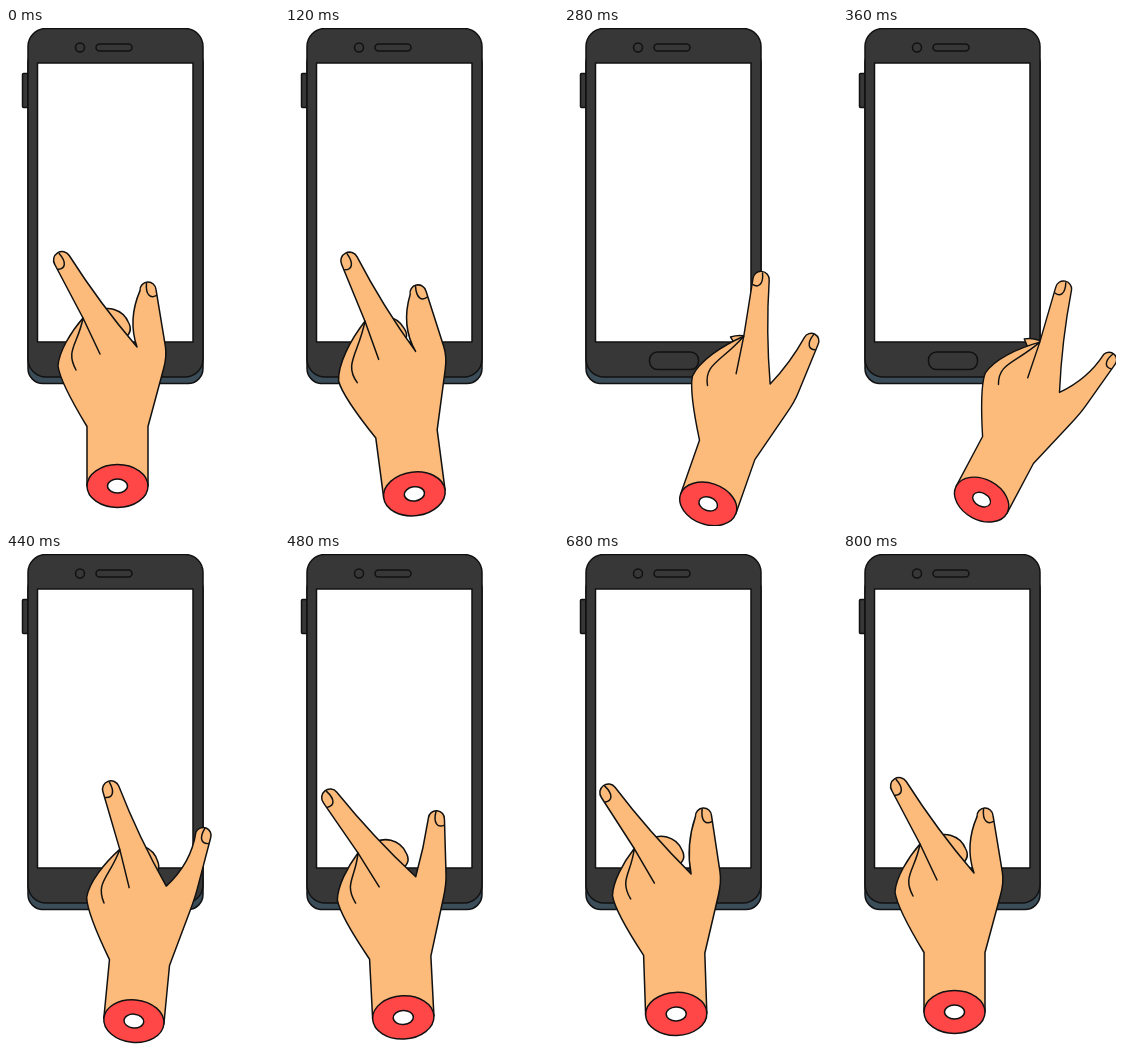
An HTML page that plays this animation: 273 by 498 pixels, repeating every 1920 ms.

```html
<!DOCTYPE html>
<html lang="en">
<head>
<meta charset="utf-8">
<title>Swiping hand</title>
<style>
  html, body { margin: 0; width: 100%; height: 100%; overflow: hidden; background: #fff; }
  svg { display: block; width: 100%; height: 100%; }
  .line { stroke: #111; stroke-width: 1.5; stroke-linejoin: round; stroke-linecap: round; fill: none; }
  .case { fill: #373737; }
  .skin { fill: #fcbb7a; }
</style>
</head>
<body>
<svg viewBox="0 0 273 498">
  <g class="line">
    <rect class="case" x="16.5" y="45.5" width="6" height="34" rx="1"/>
    <rect x="22" y="20" width="175" height="335.500" rx="15" fill="#3b4d59"/>
    <rect class="case" x="22" y="0.500" width="175" height="348.500" rx="18"/>
    <rect x="31.500" y="35" width="155.500" height="279" fill="#fff"/>
    <circle cx="74" cy="19.500" r="4.500"/>
    <rect x="90" y="16" width="36" height="7" rx="3.500"/>
    <rect x="85.500" y="324" width="49" height="17.500" rx="8"/>
  </g>
  <!-- the hand hangs on its wrist, which is the origin of this group -->
  <g id="arm" class="line">
    <path id="curled" class="skin" d="M-26-112C-10-124 6-116 11-104C16-95 10-90 5-87Z"/>
    <path id="hand" class="skin"/>
    <path id="folds"/>
    <g transform="translate(0 59.500)">
      <ellipse rx="30.500" ry="21.500" fill="#ff4747"/>
      <ellipse rx="10" ry="7" fill="#fff"/>
    </g>
  </g>
</svg>
<script>
const LOOP = 1920, STEP = 40, REST = 800;
const FINGER_R = 8.5, THUMB_R = 8, ARM_R = 30.5, ARM_LEN = 59.5;

// Resting hand, measured from the wrist.
const TIP = [-55.5, -166.5], KNUCKLE = [-34.5, -108.5], CREASE = [-17.5, -72.5];
const WEB = [19.5, -79.5], THUMB = [30.5, -136.5];
const HEEL = [49.5, -70.5], PALM = [-59.5, -60.5];
const FINGER_PIVOT = [0, -75], THUMB_PIVOT = [35, -75];

// Time, wrist x and y, then degrees: turn of the hand, of the finger, of the thumb.
const keys = [
  [0, 111.5, 398.5, 0, 0, 0],
  [120, 121.5, 406, -7.5, 13, -1],
  [200, 143.5, 414.5, 0.5, 15, 7],
  [360, 165, 422, 28, 16, 18],
  [440, 133.5, 408.5, 5.5, 6, 20],
  [520, 103, 401, -7.5, -11, 4],
  [560, 105.5, 401.5, -6, -9, 5],
  [REST, 111.5, 398.5, 0, 0, 0]
];

// Speed of value i at key k, from the slopes on both sides.
function speed(k, i) {
  if (k === 0 || k === keys.length - 1) return 0;
  const [a, b, c] = keys.slice(k - 1, k + 2);
  const h1 = b[0] - a[0], h2 = c[0] - b[0];
  return ((b[i] - a[i]) / h1 * h2 + (c[i] - b[i]) / h2 * h1) / (h1 + h2);
}

function poseAt(t) {
  let k = 0;
  while (k < keys.length - 2 && t >= keys[k + 1][0]) k++;
  const a = keys[k], b = keys[k + 1];
  const h = b[0] - a[0], s = (t - a[0]) / h, r = 1 - s;
  return [1, 2, 3, 4, 5].map(i =>
    (1 + 2 * s) * r * r * a[i] + s * s * (3 - 2 * s) * b[i]
    + h * s * r * (r * speed(k, i) - s * speed(k + 1, i)));
}

const lerp = (a, b, f) => [a[0] + (b[0] - a[0]) * f, a[1] + (b[1] - a[1]) * f];
const shift = (p, x, y) => [p[0] + x, p[1] + y];
const along = (p, d, n) => [p[0] + d[0] * n, p[1] + d[1] * n];
const normal = ([x, y]) => [-y, x];
const unit = (a, b) => {
  const x = b[0] - a[0], y = b[1] - a[1], len = Math.hypot(x, y);
  return [x / len, y / len];
};
const rotate = (p, pivot, deg) => {
  const c = Math.cos(deg * Math.PI / 180), s = Math.sin(deg * Math.PI / 180);
  const x = p[0] - pivot[0], y = p[1] - pivot[1];
  return [pivot[0] + x * c - y * s, pivot[1] + x * s + y * c];
};
const txt = p => p.map(v => v.toFixed(2)).join(' ');
const cmd = (c, ...pts) => c + pts.map(txt).join(' ');
const arc = (r, p) => `A${r} ${r} 0 0 1 ${txt(p)}`;

function nail(p, down, side) {
  const n = normal(down);
  const at = (x, y) => along(along(p, n, x * side), down, y);
  return cmd('M', at(8, 6)) + cmd('C', at(2, 9), at(-3, 5), at(-1, -7));
}

const part = id => document.getElementById(id);
const arm = part('arm'), curled = part('curled'), hand = part('hand'), folds = part('folds');

function draw(t) {
  const [x, y, turn, point, spread] = poseAt(t);

  // Turning away from the viewer makes the hand look a little smaller.
  const size = 1 - turn / 500;
  arm.setAttribute('transform', `translate(${x} ${y}) rotate(${turn}) scale(${size})`);
  curled.setAttribute('transform', `translate(${-Math.max(0, turn) / 2} 0)`);

  const [tip, knuckle, crease] = [TIP, KNUCKLE, CREASE].map(p => rotate(p, FINGER_PIVOT, point));
  const fDown = unit(tip, lerp(crease, WEB, 0.5)), fSide = normal(fDown);
  const tipL = along(tip, fSide, FINGER_R), tipR = along(tip, fSide, -FINGER_R);
  const fBend = along(lerp(tipR, WEB, 0.5), fSide, 4);

  const thumb = rotate(THUMB, THUMB_PIVOT, spread);
  const tDown = unit(thumb, THUMB_PIVOT), tSide = normal(tDown);
  const thumbL = along(thumb, tSide, THUMB_R), thumbR = along(thumb, tSide, -THUMB_R);
  const tBend = along(lerp(WEB, thumbL, 0.5), tSide, 11 - 1.1 * spread);

  const dx = knuckle[0] - PALM[0], dy = PALM[1] - knuckle[1];

  hand.setAttribute('d',
    cmd('M', [-ARM_R, ARM_LEN]) + cmd('L', [-ARM_R, 0]) +
    cmd('Q', shift(PALM, 2, 16), PALM) +
    cmd('C', shift(PALM, 0.04 * dx, -0.3 * dy), shift(knuckle, -0.5 * dx, 0.3 * dy), knuckle) +
    cmd('L', tipL) + arc(FINGER_R, tipR) + cmd('Q', fBend, WEB) +
    cmd('Q', tBend, thumbL) + arc(THUMB_R, thumbR) +
    cmd('L', lerp(thumbR, HEEL, 0.85)) +
    cmd('Q', HEEL, lerp(HEEL, [ARM_R, 0], 0.18)) +
    cmd('L', [ARM_R, 0]) + cmd('L', [ARM_R, ARM_LEN]) + 'Z');

  const fold = shift(PALM, 18, 4);
  folds.setAttribute('d',
    cmd('M', knuckle) + cmd('L', crease) +
    cmd('M', knuckle) +
    cmd('C', shift(lerp(knuckle, fold, 0.7), 0, -10), shift(fold, -11, -20), fold) +
    nail(tip, fDown, 1) + nail(thumb, tDown, -1));
}

const start = performance.now();
function tick() {
  const t = (performance.now() - start) % LOOP;
  draw(Math.min(REST, Math.floor(t / STEP) * STEP));
  requestAnimationFrame(tick);
}
tick();
</script>
</body>
</html>
```
